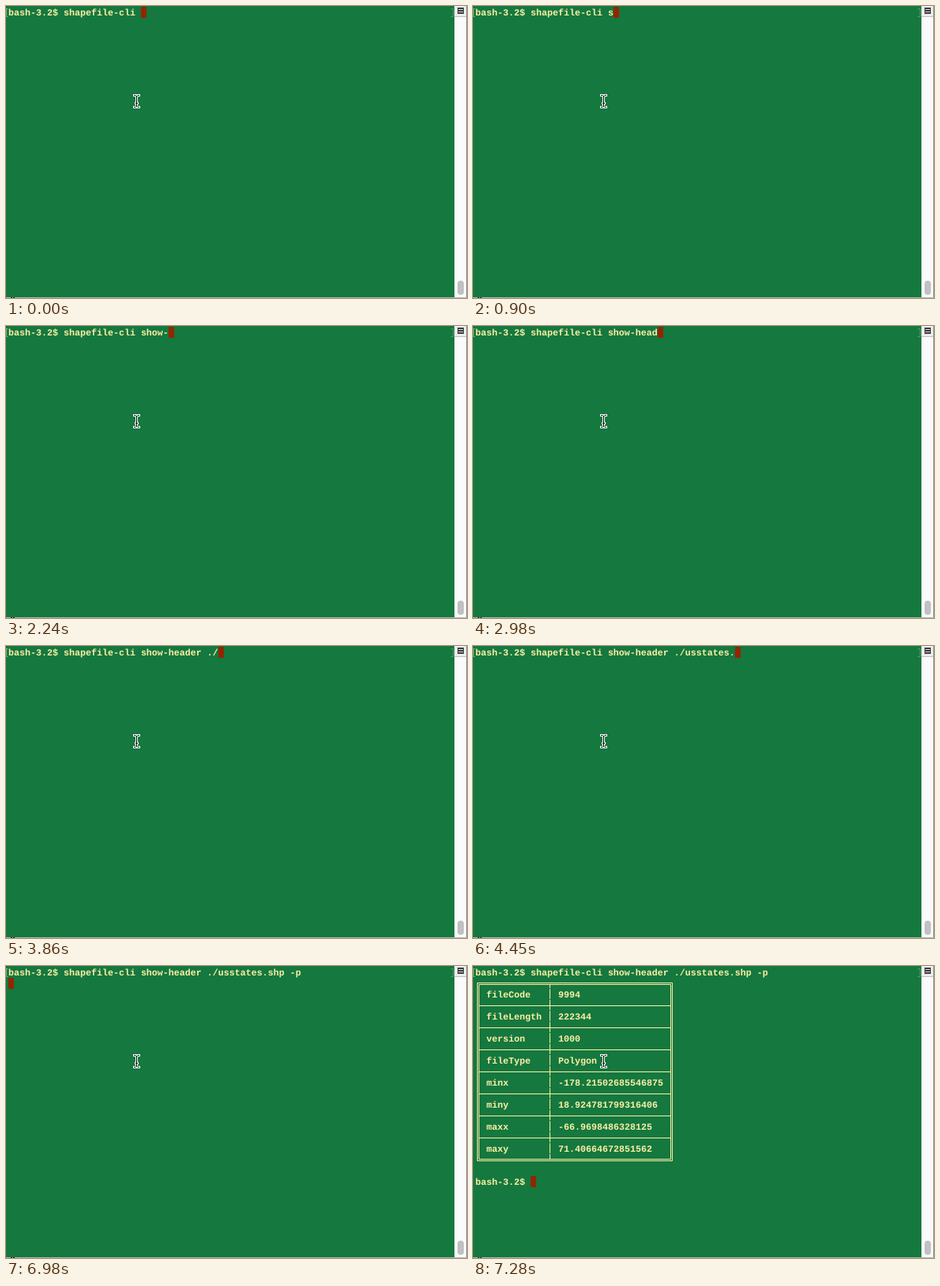
An HTML page that plays this animation: 584x371 px, repeating every 8000 ms.

```html
<!DOCTYPE html>
<html lang="en">
<head>
<meta charset="utf-8">
<title>Terminal</title>
<style>
  html, body { margin: 0; width: 100%; height: 100%; overflow: hidden; background: #15783f; }
  svg { display: block; width: 584px; height: 371px; }
  text {
    font: bold 11.665px "Liberation Mono", "Courier New", monospace;
    fill: #fff0a5;
    white-space: pre;
    text-rendering: geometricPrecision;
  }
  .rule { fill: none; stroke: #fff0a5; stroke-width: 1; }
</style>
</head>
<body>
<svg id="stage" viewBox="0 0 584 371">
  <rect width="584" height="371" fill="#15783f"/>
  <path d="M2.5 3.5H.5V13.5H2.5" fill="none" stroke="#79b172"/>
  <path d="M563.5 3.5H566.5V13.5H563.5" fill="none" stroke="#4f9c62"/>
  <rect id="caret" width="7" height="14" fill="#932600"/>
  <text id="command" y="12" x="3"></text>
  <g id="output"></g>

  <g id="pointer" fill="none" stroke-linecap="square">
    <path id="beam" d="M162.5 113.5H164L165.5 115L167 113.5H168.5M165.5 115V127M162.5 128.5H164L165.5 127L167 128.5H168.5M164.5 123.5H166.5" stroke="#fff" stroke-width="3"/>
    <use href="#beam"/>
    <path d="M162.5 113.5H164L165.5 115L167 113.5H168.5M165.5 115V127M162.5 128.5H164L165.5 127L167 128.5H168.5M164.5 123.5H166.5" stroke="#000"/>
  </g>

  <g id="scrollbar">
    <rect x="568" width="16" height="371" fill="#fafafa"/>
    <rect x="568" width="1" height="371" fill="#e4e8e5"/>
    <rect x="568" width="15" height="13" fill="#ececec"/>
    <rect x="568" y="13" width="15" height="1" fill="#bdbdbd"/>
    <rect x="572" y="2" width="8" height="8" fill="#3b3b3b"/>
    <path d="M573 4.5H579M573 7.5H579" stroke="#d8d8d8"/>
    <rect x="572" y="349" width="8" height="18" rx="4" fill="#c1c1c1"/>
    <rect x="583" width="1" height="371" fill="#8f8f8f"/>
  </g>
  <rect y="370" width="584" height="1" fill="#a9b8ae"/>
  <path d="M6 370.5H8M9 370.5H11" stroke="#222"/>
</svg>
<script>
const LOOP = 8000, CELL = 7, LINE = 14, LEFT = 3, TOP = 1;
const PROMPT = 'bash-3.2$ ';
const FULL = PROMPT + 'shapefile-cli show-header ./usstates.shp -p';

// [time, number of characters on the command line]
const typing = [
  [0, 24], [900, 25], [1050, 26], [1190, 27], [1340, 28], [2240, 29],
  [2540, 30], [2690, 32], [2980, 33], [3130, 34], [3280, 35], [3570, 36],
  [3720, 37], [3860, 38], [4010, 39], [4160, 40], [4450, 47], [5350, 48],
  [5500, 49], [5650, 50], [5940, 51], [6390, 52], [6680, 53]
];
const ENTER = 6980, RESULT = 7280;

const fields = [
  ['fileCode', '9994'],
  ['fileLength', '222344'],
  ['version', '1000'],
  ['fileType', 'Polygon'],
  ['minx', '-178.21502685546875'],
  ['miny', '18.924781799316406'],
  ['maxx', '-66.9698486328125'],
  ['maxy', '71.40664672851562']
];

const get = id => document.getElementById(id);
const caret = get('caret'), command = get('command'), output = get('output');
const colX = col => LEFT + col * CELL;
const rowY = row => TOP + row * LINE;

function add(tag, attrs, content = '') {
  const el = document.createElementNS('http://www.w3.org/2000/svg', tag);
  for (const key in attrs) el.setAttribute(key, attrs[key]);
  el.textContent = content;
  output.append(el);
}

const label = (col, row, s) => add('text', { x: colX(col), y: rowY(row) + 11 }, s);
const rule = d => add('path', { class: 'rule', d });

function buildTable() {
  const lastRow = 2 * fields.length + 1;
  const top = rowY(1) + 6.5, bottom = rowY(lastRow) + 6.5;
  rule(`M5.5 ${top}H252.5V${bottom + 2}H5.5Z`);
  rule(`M7.5 ${top + 2}H250.5V${bottom}H7.5Z`);
  fields.forEach(([name, value], i) => {
    const row = 2 + 2 * i;
    label(2, row, name);
    label(15, row, value);
    if (i) rule(`M8 ${rowY(row - 1) + 7.5}H250`);
  });
  // column divider: one stroke per text line, with small gaps
  rule(`M97.5 ${top + 2}V${rowY(2) - 1}`);
  for (let row = 2; row < lastRow; row++) rule(`M97.5 ${rowY(row)}v13`);
  rule(`M97.5 ${rowY(lastRow)}V${bottom}`);
  label(0, lastRow + 2, PROMPT);
}

function placeCaret(col, row) {
  caret.setAttribute('x', colX(col));
  caret.setAttribute('y', rowY(row));
}

function render(t) {
  let count = 0;
  for (const [at, n] of typing) if (t >= at) count = n;
  command.textContent = FULL.slice(0, count);
  output.style.display = t >= RESULT ? '' : 'none';
  if (t >= RESULT) placeCaret(PROMPT.length, 19);
  else if (t >= ENTER) placeCaret(0, 1);
  else placeCaret(count, 0);
}

buildTable();
const start = performance.now();
function tick() {
  render((performance.now() - start) % LOOP);
  requestAnimationFrame(tick);
}
tick();
</script>
</body>
</html>
```
